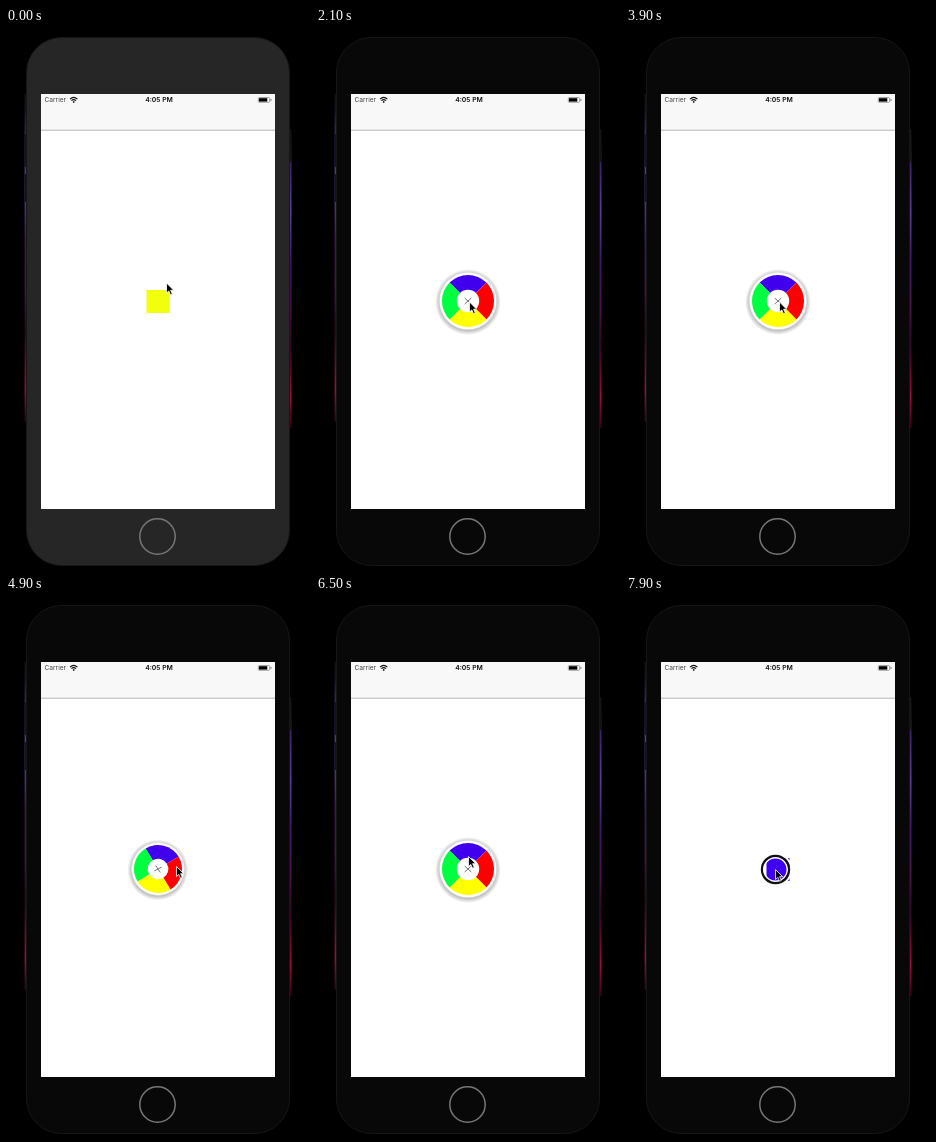
These frames come from a looping animation (304 by 540 pixels, 8 s). An HTML page:

```html
<!DOCTYPE html>
<html lang="en">
<head>
<meta charset="utf-8">
<title>Colour wheel menu</title>
<style>
html, body { margin: 0; width: 100%; height: 100%; overflow: hidden; background: #000; }
svg { display: block; width: 100vw; height: 100vh; }
text { font-family: Inter, "Liberation Sans", sans-serif; }
</style>
</head>
<body>
<svg viewBox="0 0 304 540">
  <defs>
    <linearGradient id="glow" x1="0" y1="0" x2="0" y2="1">
      <stop offset="0" stop-color="#08040e"/>
      <stop offset=".12" stop-color="#3a2468"/>
      <stop offset=".28" stop-color="#5b3c9c"/>
      <stop offset=".45" stop-color="#3b1660"/>
      <stop offset=".6" stop-color="#4a1348"/>
      <stop offset=".72" stop-color="#2a0620"/>
      <stop offset=".9" stop-color="#a00d3c"/>
      <stop offset="1" stop-color="#30040f"/>
    </linearGradient>
    <radialGradient id="shade">
      <stop offset=".82" stop-color="#000" stop-opacity=".32"/>
      <stop offset="1" stop-color="#000" stop-opacity="0"/>
    </radialGradient>
  </defs>
  <rect width="304" height="540"/>
  <rect x="18.6" y="66" width="4" height="328" fill="url(#glow)"/>
  <rect x="281.5" y="101" width="4" height="299" fill="url(#glow)"/>
  <g fill="#141414">
    <rect x="18.8" y="66" width="3" height="18"/>
    <rect x="18.8" y="106" width="3" height="33"/>
    <rect x="18.8" y="146" width="3" height="28"/>
    <rect x="282" y="101" width="3.2" height="33"/>
  </g>
  <rect id="phone" x="20.5" y="9.5" width="263" height="528" rx="35" stroke="#161616"/>
  <circle cx="151.5" cy="508.5" r="17.7" fill="none" stroke="#777" stroke-width="1.5"/>
  <rect x="35" y="66" width="234" height="415" fill="#fff"/>
  <rect x="35" y="66" width="234" height="36" fill="#f8f8f8"/>
  <rect x="35" y="101.7" width="234" height="1" fill="#b4b4b4"/>
  <text x="38.5" y="74.4" font-size="6.6" fill="#444">Carrier</text>
  <g fill="none" stroke="#111" stroke-width="1.1">
    <path d="M64 71.2Q67.7 67.7 71.4 71.2M65.4 72.7Q67.7 70.5 70 72.7"/>
    <circle cx="67.7" cy="73.9" r=".35"/>
  </g>
  <text x="153" y="74.4" font-size="6.8" font-weight="600" text-anchor="middle" fill="#111">4:05 PM</text>
  <rect x="252.3" y="69.5" width="11.4" height="4.8" rx="1" fill="#fff" stroke="#666" stroke-width=".6"/>
  <rect x="253" y="70.2" width="8.3" height="3.4" fill="#000"/>
  <rect x="264.5" y="71" width=".9" height="1.8" fill="#666"/>

  <rect id="square" x="140.5" y="262" width="23" height="23"/>
  <g id="wheel">
    <circle r="33" cy="1" fill="url(#shade)"/>
    <circle r="28.6" fill="#fff" stroke="#ddd" stroke-width=".6"/>
    <g id="parts"></g>
    <circle r="11.2" fill="#fff"/>
    <path d="M-3.3-3L3.3 3M3.3-3L-3.3 3" stroke="#666" stroke-width=".9"/>
  </g>
  <g id="ring" fill="none">
    <circle r="15.8" stroke="#fff" stroke-width="2"/>
    <circle r="11.8" stroke="#fff" stroke-width="1.6"/>
    <circle r="13.6" stroke="#111" stroke-width="2.2"/>
  </g>
  <path id="cursor" d="M0 0V10L2.3 7.9L4 11.7L5.8 10.9L4.1 7.2H7.2Z" fill="#000" stroke="#fff" stroke-width=".8"/>
</svg>
<script>
const LOOP = 8000, STEP = 100;
const OPEN = 350, CLOSE = 360, PRESS = 200;
const $ = id => document.getElementById(id);
const clamp = v => Math.max(0, Math.min(1, v));
const smooth = v => v * v * (3 - 2 * v);
const progress = (t, start, span) => clamp((t - start) / span);

const wheelColors = ['#4000ee', '#ff0000', '#ffff00', '#00ff40'];
const wedge = 'M0 0L-18.4-18.4A26 26 0 0 1 18.4-18.4Z';
$('parts').innerHTML = wheelColors
  .map((c, i) => `<path d="${wedge}" fill="${c}" transform="rotate(${i * 90})"/>`).join('');

// start, end, x, y of each pointer move
const moves = [
  [100, 600, 154, 268], [1000, 1300, 153.5, 274], [4100, 4600, 170.5, 270.5],
  [5200, 5700, 153, 273], [6150, 6500, 152.5, 260.5], [7300, 7700, 149.5, 273.5]
];
const clicks = [800, 2400, 3200, 4600, 5800, 6700, 7800];
const cycles = [[950, 2500], [3400, 4800], [6000, 6900]];

function pointer(t) {
  let x = 160.5, y = 255;
  for (const [a, b, px, py] of moves) {
    const k = smooth(progress(t, a, b - a));
    x += (px - x) * k;
    y += (py - y) * k;
  }
  return `translate(${x} ${y})`;
}

function openness(t) {
  let amount = 0;
  for (const [a, b] of cycles) {
    if (t < a) continue;
    const opened = 1 - (1 - progress(t, a, OPEN)) ** 2;
    amount = opened - progress(t, b, CLOSE) ** 2;
  }
  return amount;
}

function draw(t) {
  const shade = Math.round(38 - 30 * progress(t, 0, 600));
  $('phone').setAttribute('fill', `rgb(${shade},${shade},${shade})`);
  $('square').setAttribute('fill', t < 4800 ? '#f2ff0c' : t < 6900 ? '#ff0000' : '#4000f4');

  const size = openness(t);
  $('wheel').setAttribute('visibility', size > 0.01 ? 'visible' : 'hidden');
  $('wheel').setAttribute('transform',
    `translate(152 273) rotate(${(1 - size) * 180}) scale(${size})`);

  const at = pointer(t);
  const pressed = clicks.some(c => t >= c && t < c + PRESS);
  $('cursor').setAttribute('transform', at);
  $('ring').setAttribute('transform', at);
  $('ring').setAttribute('visibility', pressed ? 'visible' : 'hidden');
}

function tick() {
  const t = performance.now() % LOOP;
  draw(Math.floor(t / STEP) * STEP);
  requestAnimationFrame(tick);
}
tick();
</script>
</body>
</html>
```
